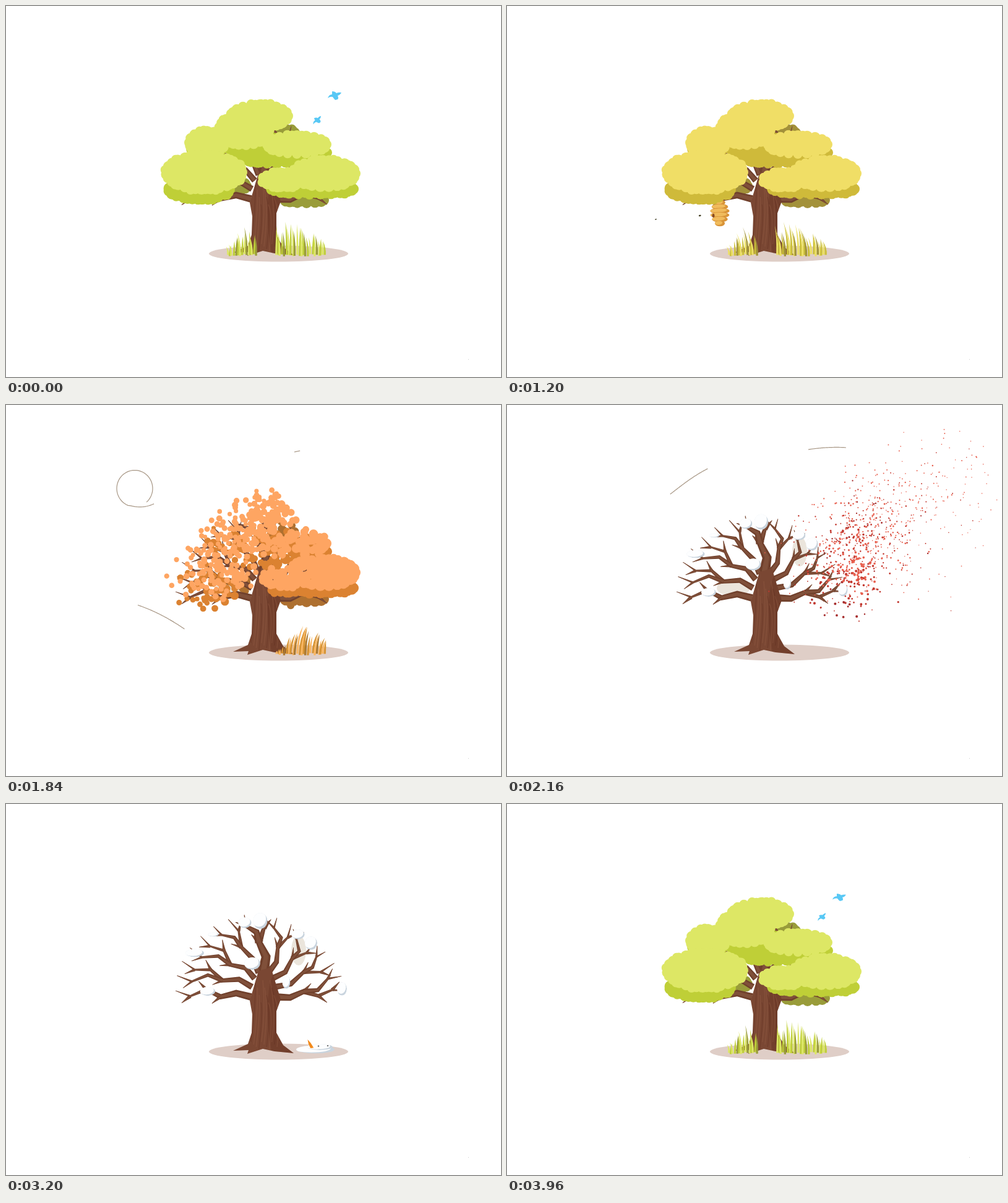
Animation, 800 px wide and 600 px high, one loop 4000 ms. Source, as an HTML page with a canvas:

```html
<!DOCTYPE html>
<html>
<head>
<meta charset="utf-8">
<title>Four seasons of a tree</title>
<style>
html, body { margin: 0; width: 100%; height: 100%; overflow: hidden; background: #fff; }
canvas { display: block; }
</style>
</head>
<body>
<canvas id="stage" width="800" height="600"></canvas>
<script>
const ctx = document.getElementById('stage').getContext('2d');
const LOOP = 4000, STEP = 40;
const { sin, cos, PI, max, hypot } = Math;

let seed = 11;
const rand = () => (seed = (seed * 16807) % 2147483647) / 2147483647;
const spread = range => (rand() - .5) * 2 * range;
const clamp = v => max(0, Math.min(1, v));
const mix = (a, b, k) => a + (b - a) * k;
const ramp = (t, from, to) => clamp((t - from) / (to - from));

// Piecewise linear value through time/value pairs.
function track(t, ...keys) {
  if (t <= keys[0]) return keys[1];
  for (let i = 2; i < keys.length; i += 2) {
    if (t < keys[i]) return mix(keys[i - 1], keys[i + 1], (t - keys[i - 2]) / (keys[i] - keys[i - 2]));
  }
  return keys[keys.length - 1];
}

function polygon(list) {
  const path = new Path2D();
  list.forEach(p => path.lineTo(...p));
  path.closePath();
  return path;
}

function fill(path, style) {
  ctx.fillStyle = style;
  ctx.fill(path);
}

function ellipse(x, y, rx, ry, style, angle = 0) {
  ctx.fillStyle = style;
  ctx.beginPath();
  ctx.ellipse(x, y, rx, ry, angle, 0, 7);
  ctx.fill();
}

// Runs paint with the canvas scaled around a point.
function scaled(x, y, k, paint) {
  if (!k) return;
  ctx.save();
  ctx.translate(x, y);
  ctx.scale(k, k);
  ctx.translate(-x, -y);
  paint();
  ctx.restore();
}

// ---- Seasonal colours: lime, yellow, orange, red for light, dark and back leaves
const TURNS = [300, 1200, 1840, 2160];
const SHADES = [
  ['dde765', 'f0de66', 'fea562', 'e8604f'],
  ['bfcf37', 'cfba3a', 'db8231', 'c2382f'],
  ['999c3a', 'a3913a', 'ae7030', 'a62d2d']
];
function shadeAt(shade, t) {
  const channel = at => track(t > 2800 ? 0 : t,
    ...TURNS.flatMap((turn, i) => [turn, parseInt(SHADES[shade][i].slice(at, at + 2), 16)]));
  return `rgb(${[0, 2, 4].map(channel).map(Math.round)})`;
}

// ---- Wood: limbs fan out to an elliptical crown and fork once
const limbs = [];

function taper(list, width) {
  const last = list.length - 1, left = [], right = [];
  list.forEach(([x, y], i) => {
    const a = list[max(0, i - 1)], b = list[Math.min(last, i + 1)];
    const angle = Math.atan2(b[1] - a[1], b[0] - a[0]);
    const half = mix(width, .6, (i / last) ** 1.3) / 2;
    left.push([x + sin(angle) * half, y - cos(angle) * half]);
    right.unshift([x - sin(angle) * half, y + cos(angle) * half]);
  });
  return polygon(left.concat(right));
}

function addLimb(list, width) {
  limbs.push([taper(list, width), taper(list, width * .5)]);
}

function crownPoint(angle) {
  const reach = 1 - .1 * max(0, sin(2 * angle));
  return [412 + 138 * reach * cos(angle), 302 - 125 * reach * sin(angle)];
}

function growLimb([x, y], angle, width, forks) {
  const [tipX, tipY] = crownPoint(angle);
  const length = hypot(tipX - x, tipY - y), dx = (tipX - x) / length, dy = (tipY - y) / length;
  const count = max(3, Math.round(length / 23)), joints = [];
  for (let i = 0; i <= count; i++) {
    const bend = i % count ? (i % 2 ? 1 : -1) * (5 + spread(2)) : 0, along = length * i / count;
    joints.push([x + dx * along - dy * bend, y + dy * along + dx * bend]);
  }
  addLimb(joints, width);
  for (let i = 2; i < count; i++) {
    const [jx, jy] = joints[i], side = i % 2 ? 1 : -1;
    addLimb([joints[i], [jx + 13 * dx - 12 * dy * side, jy + 13 * dy + 12 * dx * side]], width * .5);
  }
  if (forks) growLimb(joints[2], angle + PI / 16, width * .75, false);
}

for (let i = 0; i <= 8; i++) {
  const angle = PI * i / 8;
  const width = i === 4 ? 18 : i % 8 ? 10 : 12;
  growLimb([416 + 20 * cos(angle), 312 - 42 * sin(angle)], angle, width, i < 8);
}

const trunk = polygon([
  [394, 318], [398, 340], [397, 370], [391, 388], [367, 399], [392, 398], [390, 404], [415, 396],
  [434, 400], [465, 403], [448, 390], [437, 370], [437, 335], [444, 316], [428, 264], [408, 270]
]);

function drawTree() {
  for (const [body, core] of limbs) {
    fill(body, '#70402c');
    fill(core, '#80503a');
  }
  fill(trunk, '#7a4733');
  ctx.save();
  ctx.clip(trunk);
  ellipse(446, 360, 22, 90, 'rgba(90,40,26,.25)', -.08);
  ctx.lineWidth = 1.5;
  for (let i = 0; i < 11; i++) {
    const x = 397 + i * 4.2;
    ctx.strokeStyle = i % 3 ? 'rgba(158,103,78,.28)' : 'rgba(84,38,25,.25)';
    ctx.beginPath();
    ctx.moveTo(mix(x, 418, .3), 285 + i % 4 * 12);
    ctx.quadraticCurveTo(x + 6, 335, x - 1, 385 + i % 4 * 4);
    ctx.stroke();
  }
  ctx.restore();
}

// Pale light seen between the limbs
function drawGaps(t) {
  const gap = (from, to, ...shape) => { if (t >= from && t < to) ellipse(...shape, '#ebe5dc'); };
  gap(1700, 2800, 366, 296, 27, 13);
  gap(1700, 3450, 473, 237, 12, 24);
  gap(2280, 3000, 401, 215, 15, 21);
  gap(2280, 3000, 487, 282, 14, 20);
}

// ---- Foliage: bumpy ellipses made of overlapping discs
function disc(x, y, r, cx, cy) {
  return {
    x, y, r, cx, cy,
    leave: 1620 + (x - 250) * 1.25 + (y - 240) * .8 + spread(60),
    pull: .00147 * (1 + spread(.3)),
    lift: rand() * .34,
    driftX: spread(.09),
    driftY: spread(.1)
  };
}

function cluster(shade, ...lobes) {
  const discs = [];
  for (const [cx, cy, rx, ry] of lobes) {
    const count = Math.round(PI * (rx + ry) / 12.5);
    for (let i = 0; i < count; i++) {
      const a = i / count * 2 * PI, r = 8.5 + spread(1);
      discs.push(disc(cx + (rx - r) * cos(a), cy + (ry - r) * sin(a), r, cx, cy));
    }
    for (let y = cy - ry; y < cy + ry; y += 8) {
      for (let x = cx - rx; x < cx + rx; x += 8) {
        if (hypot((x - cx) / (rx - 6), (y - cy) / (ry - 6)) < 1) {
          discs.push(disc(x + spread(1), y + spread(1), 7.5, cx, cy));
        }
      }
    }
  }
  return { shade, discs };
}

const backLeaves = [cluster(2, [448, 205, 27, 14], [482, 314, 40, 13], [378, 291, 19, 15])];
const frontLeaves = [
  cluster(1, [325, 231, 34, 14], [430, 234, 75, 29], [494, 237, 33, 13]),
  cluster(0, [385, 200, 49, 33], [410, 178, 54, 27], [325, 221, 37, 27], [470, 224, 56, 23]),
  cluster(1, [312, 297, 58, 24]),
  cluster(0, [320, 269, 70, 36]),
  cluster(1, [495, 296, 75, 17]),
  cluster(0, [515, 271, 58, 30], [447, 281, 40, 20])
];

function drawLeaves(clusters, t) {
  if (t > 2440 && t < 3400) return;
  const growing = t >= 3400;
  const k = growing ? 1 - (1 - ramp(t, 3380, 3900)) ** 3 : 1;
  const wither = track(t, 1840, 1, 2160, .45, 2440, 0);
  for (const { shade, discs } of clusters) {
    ctx.fillStyle = shadeAt(shade, t);
    ctx.beginPath();
    for (const d of discs) {
      let x = mix(d.cx, d.x, k), y = mix(d.cy, d.y, k), r = d.r * k;
      if (!growing) {
        const loose = max(0, t - d.leave + 120), blown = d.pull * max(0, t - d.leave) ** 2;
        x += blown + d.driftX * loose;
        y += d.driftY * loose - d.lift * blown;
        r *= Math.exp(-loose / 400) * wither;
      }
      ctx.moveTo(x + r, y);
      ctx.arc(x, y, r, 0, 7);
    }
    ctx.fill();
  }
}

// ---- Grass
const blades = [];
function tuft(count, from, to, peak, height, slope) {
  for (let i = 0; i < count; i++) {
    const x = mix(from, to, (i + rand() * .7) / count);
    blades.push({
      x, y: 401 + rand() * 4, shade: i % 5 === 4 ? 2 : i % 2, lean: spread(3),
      h: (height - Math.abs(x - peak) * slope) * (.6 + .4 * rand())
    });
  }
}
tuft(15, 357, 407, 388, 46, .9);
tuft(24, 435, 518, 458, 57, .45);

function drawGrass(t) {
  const sway = track(t, 0, -2, 1200, -6, 1700, -4, 1840, 8, 3400, 8, 3900, -2);
  const colours = [0, 1, 2].map(shade => shadeAt(shade, t > 3000 ? 0 : max(0, t - 200)));
  for (const b of blades) {
    const gone = 1840 + (b.x - 432) * 1.4, sprout = 3420 + b.x - 357;
    const k = t < 3000 ? 1 - ramp(t, gone - 60, gone) : ramp(t, sprout, sprout + 300);
    if (!k) continue;
    const tip = b.x + (b.lean + sway * b.h / 45) * k, top = b.y - b.h * k;
    ctx.fillStyle = colours[b.shade];
    ctx.beginPath();
    ctx.moveTo(b.x - 1.7, b.y);
    ctx.quadraticCurveTo(b.x - 1, mix(b.y, top, .6), tip, top);
    ctx.quadraticCurveTo(b.x + 2.4, mix(b.y, top, .5), b.x + 1.7, b.y);
    ctx.fill();
  }
}

// ---- Animals
const birdShape = new Path2D('M-11 4Q-9 -2 -4 -2L-4 -7Q1 -7 3 -4Q7 -6 11 -5Q9 -1 5 0Q7 4 5 6L1 7Q-2 4 -3 2Q-7 1 -11 4');
function drawBird(x, y, size, tilt, flap) {
  ctx.save();
  ctx.translate(x, y);
  ctx.rotate(tilt);
  ctx.scale(size, size * flap);
  fill(birdShape, '#58c8f5');
  ctx.restore();
}
function drawBirds(t) {
  const u = t > 2000 ? t - LOOP : t;
  if (u < -260 || u > 450) return;
  const flap = .85 + .15 * cos(t / 160 * PI * 2);
  drawBird(track(u, -260, 545, -40, 537, 0, 531, 450, 440),
    track(u, -260, 250, -40, 151, 0, 145, 200, 146, 450, 182), 1, 0, flap);
  drawBird(track(u, -260, 535, -40, 509, 0, 503, 350, 450),
    track(u, -260, 255, -40, 183, 0, 185, 350, 205), .78, -.45, flap);
}

function drawHive(t) {
  scaled(344, 314, ramp(t, 740, 900) * (1 - ramp(t, 1560, 1680)), () => {
    for (let i = 0; i < 6; i++) {
      const y = 318 + i * 6.7, rx = 15.7 * sin(.6 + i * .4);
      ellipse(344, y, rx, 4.8, '#d99438');
      ellipse(342, y - .8, rx - 2, 3.2, '#f0bb5c', -.06);
    }
    ellipse(333.5, 339, 2, 3, '#8a4a20');
  });
}

function drawBee(t, start, range, y, size) {
  const flight = ramp(t, start, 1660);
  if (flight === 0 || flight === 1) return;
  ellipse(333 - range * sin(PI * flight), y + 5 * sin((t - 1200) / 100), size, size * .6, '#3f3b20', -.3);
}

// ---- Wind
const bezier = (a, b, c, d) => u => [0, 1].map(n =>
  a[n] * (1 - u) ** 3 + 3 * b[n] * u * (1 - u) ** 2 + 3 * c[n] * u * u * (1 - u) + d[n] * u ** 3);
const highGust = bezier([466, 76], [515, 65], [563, 66], [610, 79]);
const lowGust = bezier([150, 312], [210, 314], [270, 342], [330, 395]);
const leaveLoop = bezier([198, 162], [258, 180], [270, 110], [380, 82]);
function loopGust(u) {
  const leg = u * 3;
  if (leg < 1) return [mix(123, 227, leg), 178 - 21 * leg * leg];
  if (leg > 2) return leaveLoop(leg - 2);
  const a = .85 - (leg - 1) * 5.2;
  return [208 + 29 * cos(a), 135 + 29.5 * sin(a)];
}
function drawGust(path, tail, head) {
  if (head - tail < .01) return;
  ctx.strokeStyle = '#a79684';
  ctx.lineWidth = 1.2;
  ctx.beginPath();
  for (let i = 0; i <= 60; i++) ctx.lineTo(...path(mix(tail, head, i / 60)));
  ctx.stroke();
}
function drawWind(t) {
  drawGust(loopGust, ramp(t, 1620, 2280), track(t, 1560, 0, 1840, .757, 2160, .933, 2280, 1));
  drawGust(highGust, ramp(t, 2080, 2640), ramp(t, 1800, 2440));
  drawGust(lowGust, ramp(t, 1700, 2100), ramp(t, 1640, 1900));
}

// ---- Snow
function snowball(x, y, rx, ry) {
  ctx.save();
  ctx.beginPath();
  ctx.ellipse(x, y, rx, ry, 0, 0, 7);
  ctx.clip();
  ellipse(x, y, rx, ry, '#c9d4de');
  ellipse(x - rx * .2, y - ry * .26, rx, ry, '#fdfeff');
  ctx.restore();
}

const drifts = [
  [305, 241, 21, 9], [335, 211, 12, 5], [386, 192, 15, 12], [411, 189, 16, 18], [398, 258, 18, 14],
  [326, 303, 17, 10], [453, 288, 9, 15], [472, 211, 15, 11], [493, 225, 14, 15], [543, 299, 11, 15]
];
function drawDrifts(t) {
  const k = track(t, 2040, 0, 2160, .7, 2440, 1, 2950, 1, 3200, .72, 3480, 0);
  if (k) drifts.forEach(([x, y, rx, ry]) => snowball(x, y, rx * k, ry * k));
}

const flakes = [[292, 191], [341, 111], [402, 149], [452, 21], [475, 78], [526, 164]];
function drawFlakes(t) {
  if (t < 2260 || t > 3160) return;
  flakes.forEach(([x, start], i) => {
    for (const wave of [0, -200]) {
      const y = start + wave + (t - 2480) * .2;
      const r = (2.9 + 1.5 * cos((i - 1.5) * 1.2)) * clamp((285 - y) / 30);
      if (y < 0 || !r) continue;
      ellipse(x, y, r, r, '#c3c6cb');
      ellipse(x - r * .45, y - r * .3, r * .85, r * .85, '#fff');
    }
  });
}

const carrot = polygon([[1, -2], [-8, 0], [-15, 3], [-7, 4], [0, 3]]);
function drawSnowman(t) {
  const melt = ramp(t, 2720, 3160), m = melt * melt * (3 - 2 * melt);
  scaled(504, 403, ramp(t, 2290, 2450) * (1 - ramp(t, 3320, 3560)), () => {
    snowball(mix(504.5, 500, m), mix(380.5, 397, m), mix(23.5, 31, m), mix(23, 6.5, m));
    snowball(mix(504.5, 507, m), mix(348, 393, m), mix(14.5, 21, m), mix(14.5, 5, m));
    ellipse(mix(493, 505, m), mix(343, 391.5, m), 1.3, mix(1.3, .8, m), '#222');
    ellipse(mix(499, 520, m), mix(343, 391, m), 1.3, mix(1.3, .8, m), '#222');
    ctx.translate(mix(496.5, 495, m), mix(349, 394, m));
    ctx.rotate(m * 1.25);
    fill(carrot, '#f28a1c');
  });
}

function draw(t) {
  ctx.fillStyle = '#fff';
  ctx.fillRect(0, 0, 800, 600);
  ellipse(440.5, 400.5, 112.5, 13, '#dfcec7');
  drawBirds(t);
  drawGaps(t);
  drawLeaves(backLeaves, t);
  drawTree();
  drawHive(t);
  drawBee(t, 960, 105, 345, 1.4);
  drawBee(t, 1140, 60, 339, 2);
  drawGrass(t);
  drawLeaves(frontLeaves, t);
  drawDrifts(t);
  drawSnowman(t);
  drawFlakes(t);
  drawWind(t);
  ctx.fillStyle = '#ccc';
  ctx.fillRect(747, 571, 1, 1);
}

function tick() {
  draw(Math.floor(performance.now() % LOOP / STEP) * STEP);
  requestAnimationFrame(tick);
}
tick();
</script>
</body>
</html>
```
